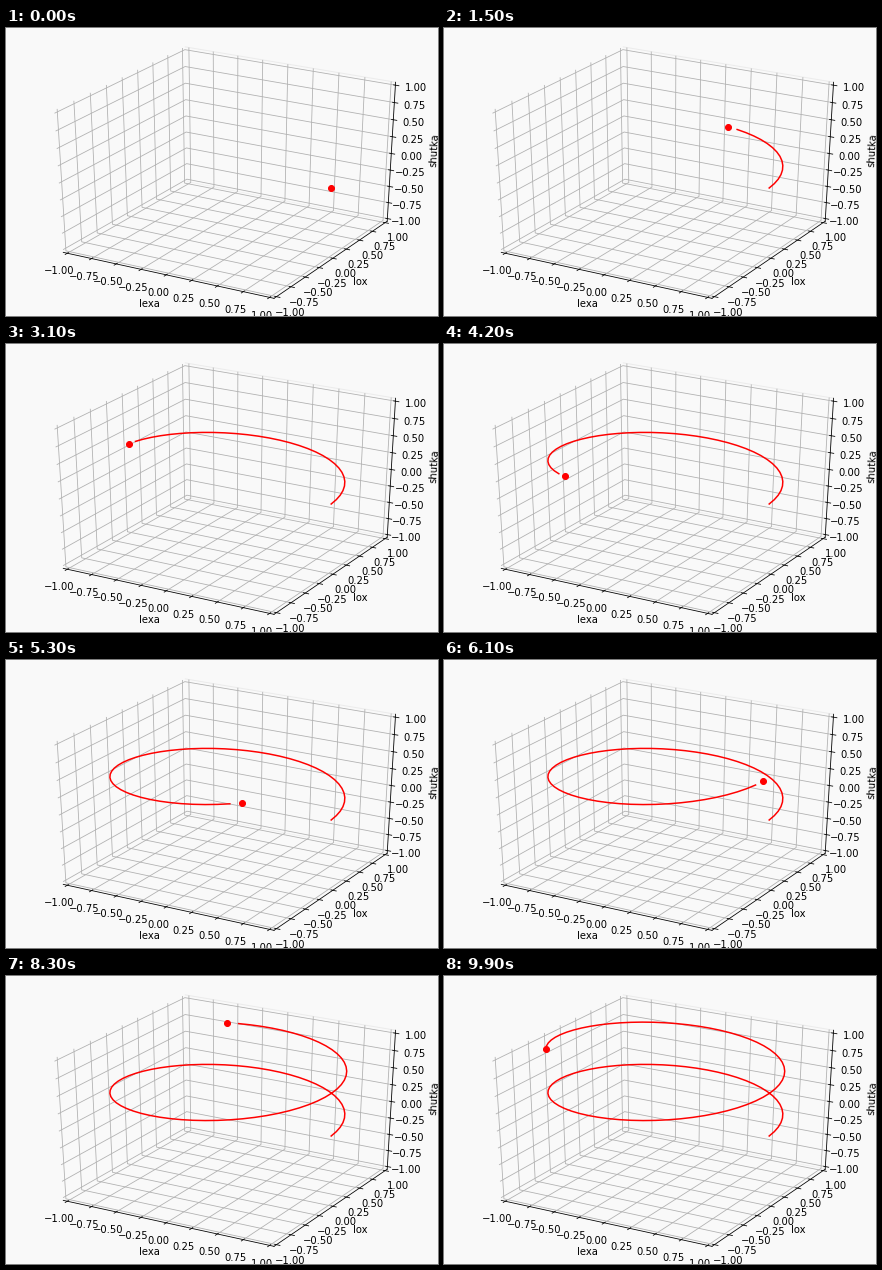
A matplotlib script that plays this animation: 432 px wide and 288 px high, repeating every 10 s.

```python
import numpy as np
import matplotlib.pyplot as plt
from matplotlib.animation import FuncAnimation
from mpl_toolkits.mplot3d import Axes3D

FRAMES = 100
BACK = "#f9f9f9"
PAD = 25 / 24  # cube edge relative to the outermost tick

plt.rcParams.update({"font.family": "DejaVu Sans", "font.size": 10})


class WideAxes(Axes3D):
    """3D axes stretched over the whole figure."""

    def apply_aspect(self, position=None):
        pass


fig = plt.figure(figsize=(6, 4), dpi=72, facecolor=BACK)
ax = WideAxes(fig, rect=(0, 0, 1, 1), facecolor=BACK)
fig.add_axes(ax)
ax.view_init(elev=30, azim=-60)
ax.set_box_aspect((1, 1, 1), zoom=np.sqrt(3) / 1.8294640721620434)

ticks = np.linspace(-1, 1, 9)
for axis, name in zip("xyz", ("lexa", "lox", "shutka")):
    ax.set(**{f"{axis}lim": (-PAD, PAD), f"{axis}ticks": ticks,
              f"{axis}label": name})
for axis in (ax.xaxis, ax.yaxis, ax.zaxis):
    axis.set_pane_color(BACK, 1)
    axis.pane.set_linewidth(0)
ax.yaxis.pane.set(edgecolor="#ececec", linewidth=1)

t = np.linspace(0, 10, FRAMES)
helix = np.array([np.cos(t), np.sin(t), t / 10])

trail, = ax.plot([], [], [], "r-", lw=1.5)
dot, = ax.plot([], [], [], "ro", ms=6)


def update(i):
    trail.set_data_3d(*helix[:, :i])
    dot.set_data_3d(*helix[:, i:i + 1])
    return trail, dot


anim = FuncAnimation(fig, update, frames=FRAMES, interval=100,
                     repeat=True, repeat_delay=0)
plt.show()
```
